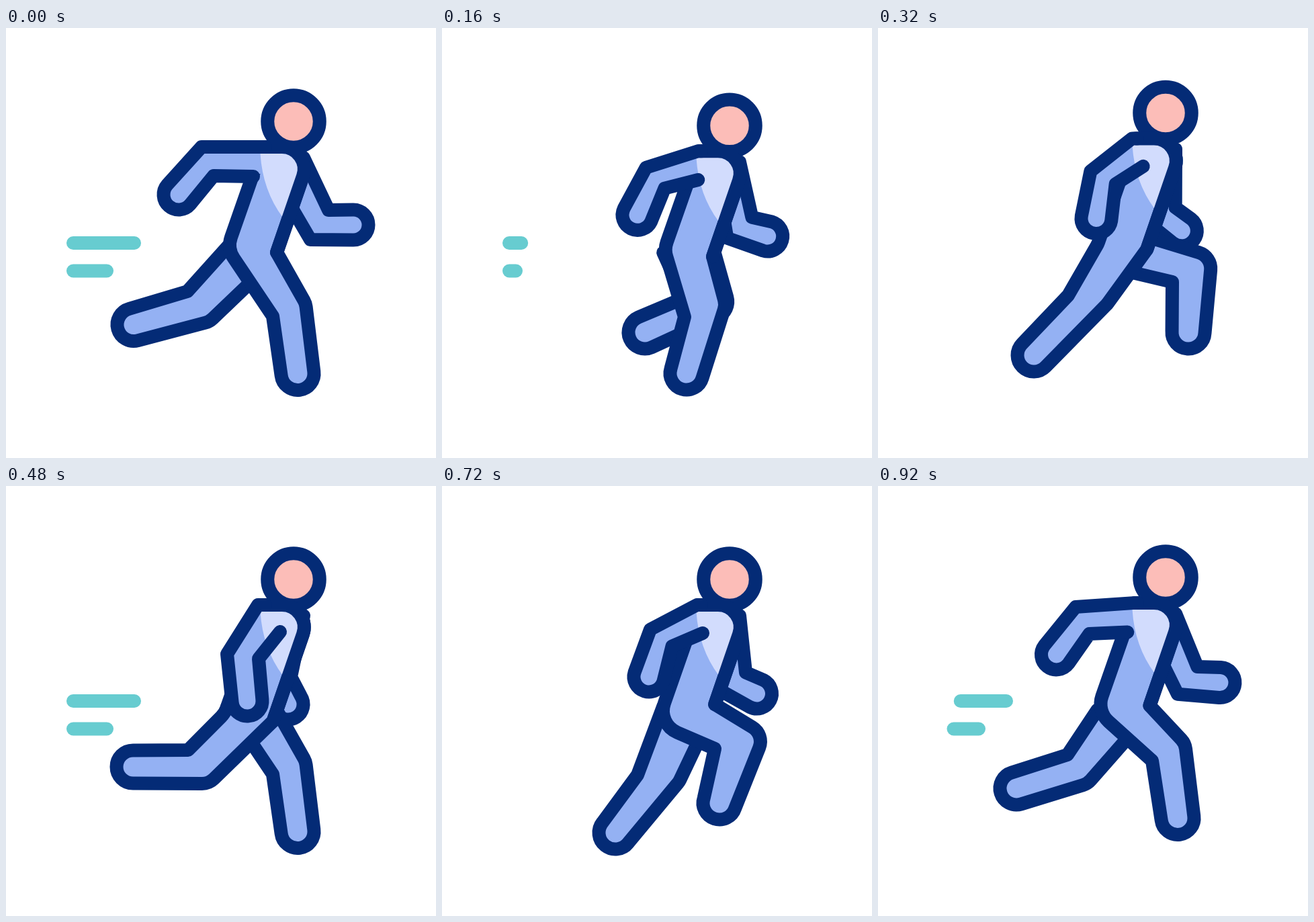
An HTML page with a canvas for the animation above (960 ms loop, 640x640 px).

```html
<!DOCTYPE html>
<html lang="en">
<head>
<meta charset="utf-8">
<title>Runner</title>
<style>
  html, body { margin: 0; width: 100%; height: 100%; overflow: hidden; background: #fff; }
  canvas { display: block; width: 640px; height: 640px; }
</style>
</head>
<body>
<canvas id="stage" width="640" height="640"></canvas>
<script>
const ctx = document.getElementById('stage').getContext('2d');
const LOOP = 960, HALF = LOOP / 2, STEP = 40;
const NAVY = '#042b76', BLUE = '#94b1f3', LIGHT = '#d2dcfd', PINK = '#fcbdb8', TEAL = '#67ccd0';

// time, vertical offset of the body
const BOB = [[0, 0], [120, 9.5], [240, 0], [320, -12.5], [480, 0]];

// time, back of knee, front of knee, foot, hip height, crotch height
const LEG = [
  [0,   397, 429, 446, 410, 434, 514.5, 328, 334],
  [120, 378, 428, 437, 426, 385, 516,   325, 334],
  [160, 361, 430, 422, 412, 364, 514,   323, 334],
  [240, 291, 430, 353, 440, 258, 516,   328, 337],
  [320, 283, 398, 341, 411, 232, 487,   334, 342],
  [440, 282, 400, 312, 443, 206, 450,   337, 348],
  [480, 271, 393, 302, 443, 189, 418,   338, 350],
  [600, 332, 406, 389, 443, 262, 442,   330, 325],
  [640, 360, 402, 430, 421, 302, 453,   328, 327],
  [720, 406, 391, 480, 370, 413, 472,   354, 325],
  [800, 438, 378, 497, 340, 462, 453,   362, 325],
  [920, 408, 409, 457, 383, 446, 494.5, 338, 330]
];
// the far leg trails a little lower at the end of its back swing
const FAR_LEG = LEG.map(r => r[0] === 480 ? [480, 270, 392, 303, 437, 190, 441.5, 325, 345] : r);

// extremes of the arm swing: inner elbow, hand, outer elbow, ends at the body
const NEAR_ARM = [
  [309, 220, 257, 248, 291, 177, 368, 221, 384, 177],
  [376, 257, 359, 320, 329, 250, 408, 217, 375, 177]
];
const FAR_ARM = [
  [480, 271, 517, 293, 453, 315, 443, 193, 415, 250],
  [424, 284, 420, 325, 367, 289, 443, 193, 415, 250]
];

const mix = (a, b, k) => a.map((v, i) => v + (b[i] - v) * k);

function sample(rows, t, period) {
  t %= period;
  let i = rows.length - 1;
  while (rows[i][0] > t) i--;
  const a = rows[i], b = rows[(i + 1) % rows.length];
  const end = i + 1 < rows.length ? b[0] : period;
  return mix(a, b, (t - a[0]) / (end - a[0])).slice(1);
}

const leftEdge = y => 366 - 0.347 * (y - 222);
const rightEdge = y => 403 - 0.347 * (y - 334);

function legPose(rows, t, bob) {
  const [bx, by, fx, fy, x, y, hip, crotch] = sample(rows, t, LOOP);
  return {
    back: [bx, by - bob], front: [fx, fy - bob], foot: [x, y - bob],
    hip: [leftEdge(hip), hip], crotch: [rightEdge(crotch), crotch]
  };
}

// rounded end of a limb that runs from between its two joint points
function cap(p, q, end, r) {
  const a = Math.atan2(end[1] - (p[1] + q[1]) / 2, end[0] - (p[0] + q[0]) / 2);
  const start = a - Math.PI / 2;
  return {
    from: [end[0] + r * Math.cos(start), end[1] + r * Math.sin(start)],
    draw: () => ctx.arc(end[0], end[1], r, start, a + Math.PI / 2)
  };
}

function traceLeg(leg) {
  const tip = cap(leg.front, leg.back, leg.foot, 24.5);
  ctx.lineTo(...leg.crotch);
  ctx.arcTo(...leg.front, ...tip.from, 25);
  tip.draw();
  ctx.lineTo(...leg.back);
}

function traceArm(a) {
  const inner = a.slice(0, 2), hand = a.slice(2, 4), outer = a.slice(4, 6);
  ctx.lineTo(...inner);
  cap(inner, outer, hand, 22.5).draw();
  ctx.lineTo(...outer);
}

function paint(fill, stroke) {
  if (fill) { ctx.fillStyle = fill; ctx.fill(); }
  if (stroke) { ctx.strokeStyle = stroke; ctx.stroke(); }
}

function shoulder() {
  ctx.arcTo(457, 177, rightEdge(334), 334, 33);
}

function drawFarArm(a) {
  ctx.beginPath();
  ctx.moveTo(a[6], a[7]);
  traceArm(a);
  ctx.lineTo(a[8], a[9]);
  ctx.closePath();
  paint(BLUE, NAVY);
}

function drawFarLeg(leg) {
  ctx.beginPath();
  ctx.moveTo(...leg.hip);
  traceLeg(leg);
  ctx.closePath();
  paint(BLUE, NAVY);
}

function drawHead() {
  ctx.beginPath();
  ctx.arc(428, 139, 38.75, 0, Math.PI * 2);
  paint(PINK, NAVY);
}

function drawBody(leg, arm) {
  ctx.beginPath();
  ctx.moveTo(382, 177);
  shoulder();
  traceLeg(leg);
  ctx.arcTo(...leg.hip, 382, 177, 35);
  ctx.closePath();
  paint(BLUE, NAVY);

  // arm fill hides the side of the torso behind it
  ctx.beginPath();
  ctx.moveTo(arm[6], arm[7]);
  traceArm(arm);
  ctx.lineTo(arm[8], arm[9]);
  ctx.lineTo(402, 208);
  ctx.closePath();
  paint(BLUE);

  ctx.beginPath();
  ctx.moveTo(378.5, 177);
  shoulder();
  ctx.lineTo(rightEdge(282), 282);
  ctx.lineTo(412, 282);
  ctx.quadraticCurveTo(382, 242, 378.5, 187);
  ctx.closePath();
  paint(LIGHT);

  ctx.beginPath();
  ctx.moveTo(384, 177);
  shoulder();
  ctx.lineTo(...leg.crotch);
  paint(null, NAVY);

  ctx.beginPath();
  ctx.moveTo(arm[6], arm[7]);
  traceArm(arm);
  ctx.lineTo(arm[8], arm[9]);
  ctx.lineTo(386, 177);
  paint(null, NAVY);
}

function drawTrails(t) {
  const u = t % HALF, out = t < HALF ? 200 : 160;
  const shrink = 1 - u / out, grow = (u - 320) / 160;
  for (const [y, len] of [[320, 91], [361.5, 50]]) {
    let x0 = 100, x1 = 100 + len;
    if (shrink > 0) x1 = x0 + len * shrink;
    else if (grow > 0) x0 = x1 - len * grow;
    else continue;
    ctx.beginPath();
    ctx.moveTo(x0, y);
    ctx.lineTo(x1, y);
    paint(null, TEAL);
  }
}

function draw(t) {
  const [bob] = sample(BOB, t, HALF);
  const swing = 1 - Math.abs(t - HALF) / HALF;
  ctx.fillStyle = '#fff';
  ctx.fillRect(0, 0, 640, 640);
  ctx.lineWidth = 20;
  ctx.lineCap = ctx.lineJoin = 'round';
  drawTrails(t);
  ctx.save();
  ctx.translate(0, bob);
  drawFarArm(mix(...FAR_ARM, swing));
  drawFarLeg(legPose(FAR_LEG, t + HALF, bob));
  drawHead();
  drawBody(legPose(LEG, t, bob), mix(...NEAR_ARM, swing));
  ctx.restore();
}

const begin = performance.now();
function tick() {
  const t = (performance.now() - begin) % LOOP;
  draw(Math.floor(t / STEP) * STEP);
  requestAnimationFrame(tick);
}
tick();
</script>
</body>
</html>
```
